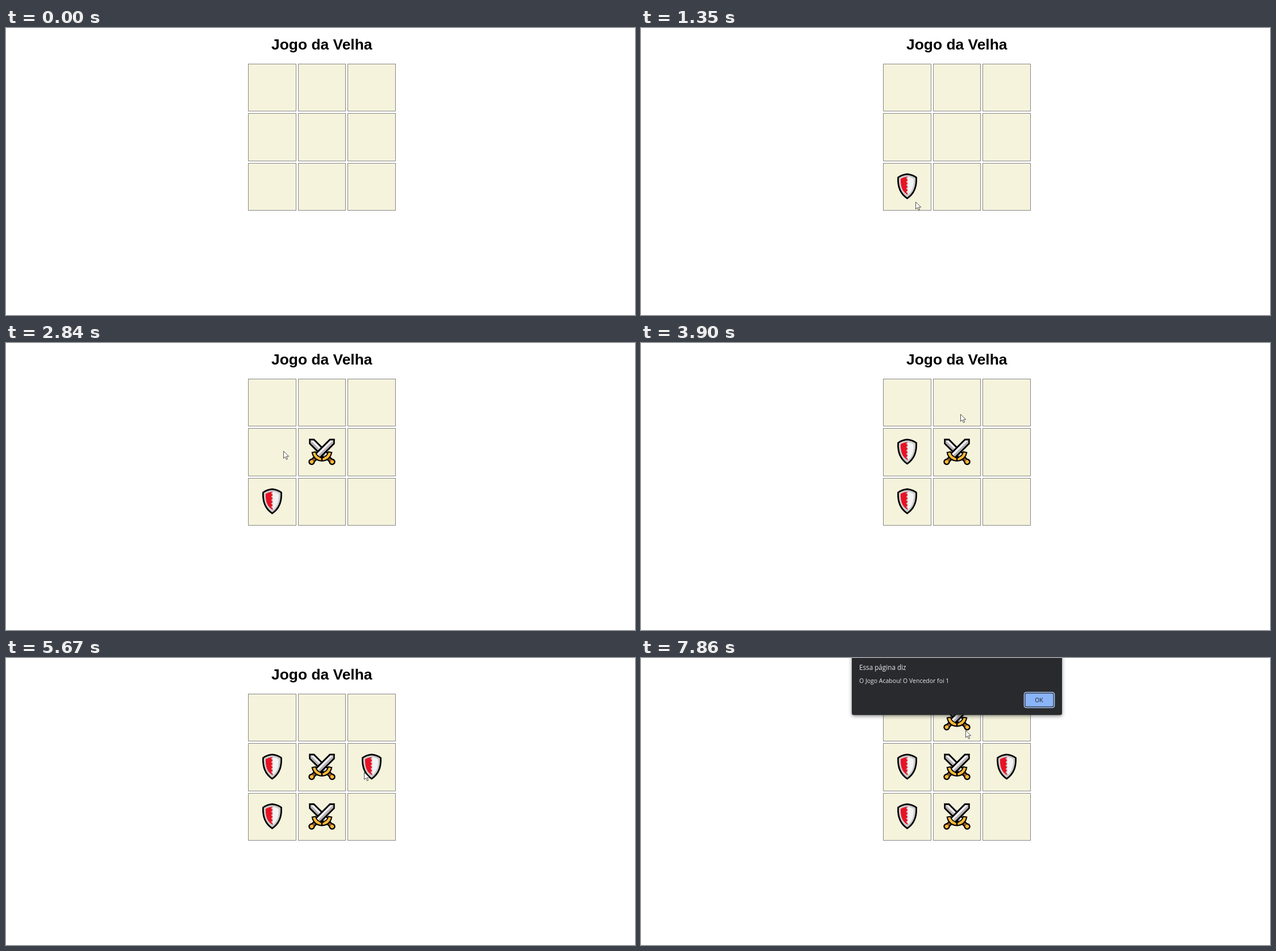
An HTML page that plays this animation: 1107x506 px, repeating every 8000 ms.

```html
<!DOCTYPE html>
<html lang="pt-BR">
<head>
<meta charset="utf-8">
<title>Jogo da Velha</title>
<style>
  html, body { margin: 0; width: 100%; height: 100%; overflow: hidden; background: #fff; }
  svg { display: block; width: 1107px; height: 506px; }
  .title { font: bold 26.4px "Liberation Sans", Arial, sans-serif; text-anchor: middle; }
  .cell { fill: #f5f3dc; stroke: #868686; }
  .dialog { filter: drop-shadow(0 2px 3px rgba(0, 0, 0, .45)); }
  .dialog text { font-family: "Open Sans", "Noto Sans", sans-serif; fill: #e8eaed; }
</style>
</head>
<body>
<svg viewBox="0 0 1107 506">
  <defs>
    <g id="shield">
      <path d="M0-21.300Q9-20.500 16-15.500C17 2 11 14 0 21.300C-11 14-17 2-16-15.500Q-9-20.500 0-21.300Z" fill="#c9c9c9" stroke="#000" stroke-width="2.700"/>
      <path d="M1-17Q7-16 11.500-13C12 1 8 10 1 15Z" fill="#f2f2f2"/>
      <path id="red" fill="#e81224"/>
    </g>
    <g id="blade">
      <path d="M0-30L5-25V11H-5V-25Z" fill="#f4f2f4" stroke="#000" stroke-width="3"/>
      <path d="M0-28.500L3.500-25V11H0Z" fill="#b5b1b5"/>
    </g>
    <g id="hilt">
      <path d="M0 13V25" stroke="#000" stroke-width="8.500"/>
      <circle cy="25.500" r="5.700"/>
      <path d="M0 13V23" stroke="#8e562e" stroke-width="4"/>
      <circle cy="25.500" r="3.200" fill="#ffb931"/>
    </g>
    <g id="swords">
      <use href="#blade" transform="scale(-1 1) rotate(45)"/>
      <use href="#blade" transform="rotate(45)"/>
      <use href="#hilt" transform="rotate(45)"/>
      <use href="#hilt" transform="scale(-1 1) rotate(45)"/>
      <g fill="none">
        <path d="M-14.500 0Q-12 13 0 13.500Q12 13 14.500 0" stroke="#000" stroke-width="8"/>
        <path d="M-14 2Q-11 12.500 0 13.300Q11 12.500 14 2" stroke="#fdbb35" stroke-width="4.500"/>
      </g>
      <path d="M0 7L4 11.500H1.300V16.500H-1.300V11.500H-4Z"/>
    </g>
  </defs>

  <rect width="1107" height="506" fill="#fff"/>
  <text class="title" x="555.750" y="38">Jogo da Velha</text>
  <g id="board"></g>

  <g id="dialog" class="dialog">
    <path d="M371-10H741V97Q741 100.500 737.500 100.500H374.500Q371 100.500 371 97Z" fill="#292a2d"/>
    <text x="384" y="20.500" font-size="11.700">Essa página diz</text>
    <text x="384" y="44" font-size="10.500">O Jogo Acabou! O Vencedor foi 1</text>
    <rect x="674.500" y="60.500" width="53" height="27" rx="3.500" fill="#292a2d" stroke="#a9c8fa" stroke-width="1.600"/>
    <rect x="676.500" y="62.500" width="49" height="23" rx="2" fill="#8ab4f8"/>
    <text x="700.500" y="77.700" font-size="10.300" text-anchor="middle" style="fill:#202124">OK</text>
  </g>

  <circle id="halo" r="10" fill="#fafa70"/>
  <path id="cursor" d="M.5.7V13.300L3.400 10.600L5.500 15.400L7.600 14.500L5.500 9.900H9.700Z" fill="#fff" stroke="#222" stroke-width=".8"/>
</svg>
<script>
  const LOOP = 8000, FRAME = 70, HOLD = 130;
  const LEFT = 426, TOP = 62.5, SIZE = 84, PITCH = 87.5;

  // [release time, cell, delay until the piece appears]
  const turns = [[1020, 6, 210], [2150, 4, 0], [2980, 3, 0], [4660, 7, 0], [5670, 5, 0], [6650, 1, 60]];

  // [from, to, x, y]
  const entry = [916, 478];
  const moves = [
    [70, 810, 484, 312],
    [1230, 1300, 483, 306],
    [1400, 1870, 539, 218],
    [2420, 2700, 488, 190],
    [3380, 3900, 562, 125],
    [4180, 4460, 563, 270],
    [4810, 4810, 571, 266],
    [4880, 5340, 630, 201],
    [5750, 6300, 572, 126],
    [7860, 7860, 571, 127]
  ];

  const $ = id => document.getElementById(id);
  const cursor = $('cursor'), halo = $('halo'), dialog = $('dialog');
  const show = (el, on) => { el.style.display = on ? '' : 'none'; };
  const ease = p => p * p * (3 - 2 * p);

  function add(tag, attrs) {
    const el = document.createElementNS('http://www.w3.org/2000/svg', tag);
    for (const key in attrs) el.setAttribute(key, attrs[key]);
    return $('board').appendChild(el);
  }

  function corner(cell) {
    return [LEFT + cell % 3 * PITCH, TOP + Math.floor(cell / 3) * PITCH];
  }

  $('red').setAttribute('d', 'M1-17' + 'l-3 3 3 3'.repeat(5) + 'V15C-8 10-12 1-11.5-13Q-7-16 1-17Z');

  for (let cell = 0; cell < 9; cell++) {
    const [x, y] = corner(cell);
    const left = Math.round(x), top = Math.round(y);
    add('rect', {
      class: 'cell', x: left + .5, y: top + .5,
      width: Math.floor(x + SIZE) - left, height: Math.floor(y + SIZE) - top
    });
  }

  const pieces = turns.map(([release, cell, delay], i) => {
    const [x, y] = corner(cell);
    const el = add('use', {
      href: i % 2 ? '#swords' : '#shield',
      transform: `translate(${x + SIZE / 2 + .5} ${y + SIZE / 2 - .5})`
    });
    return { el, at: release + delay };
  });
  const gameOver = pieces[pieces.length - 1].at;

  function cursorAt(t) {
    let [x, y] = entry;
    for (const [from, to, toX, toY] of moves) {
      if (t < from) break;
      const steps = Math.round((to - from) / FRAME) + 1;
      const step = t >= to ? steps : Math.floor((t - from) / (to - from) * (steps - 1)) + 1;
      const p = ease(step / steps);
      x += (toX - x) * p;
      y += (toY - y) * p;
    }
    return `translate(${Math.round(x)} ${Math.round(y)})`;
  }

  function draw(t) {
    const place = cursorAt(t);
    cursor.setAttribute('transform', place);
    halo.setAttribute('transform', place);
    show(cursor, t >= moves[0][0]);
    show(halo, turns.some(([release]) => t >= release - HOLD && t < release));
    show(dialog, t >= gameOver);
    for (const { el, at } of pieces) show(el, t >= at);
  }

  const start = performance.now();
  function tick() {
    draw((performance.now() - start) % LOOP);
    requestAnimationFrame(tick);
  }
  draw(0);
  requestAnimationFrame(tick);
</script>
</body>
</html>
```
